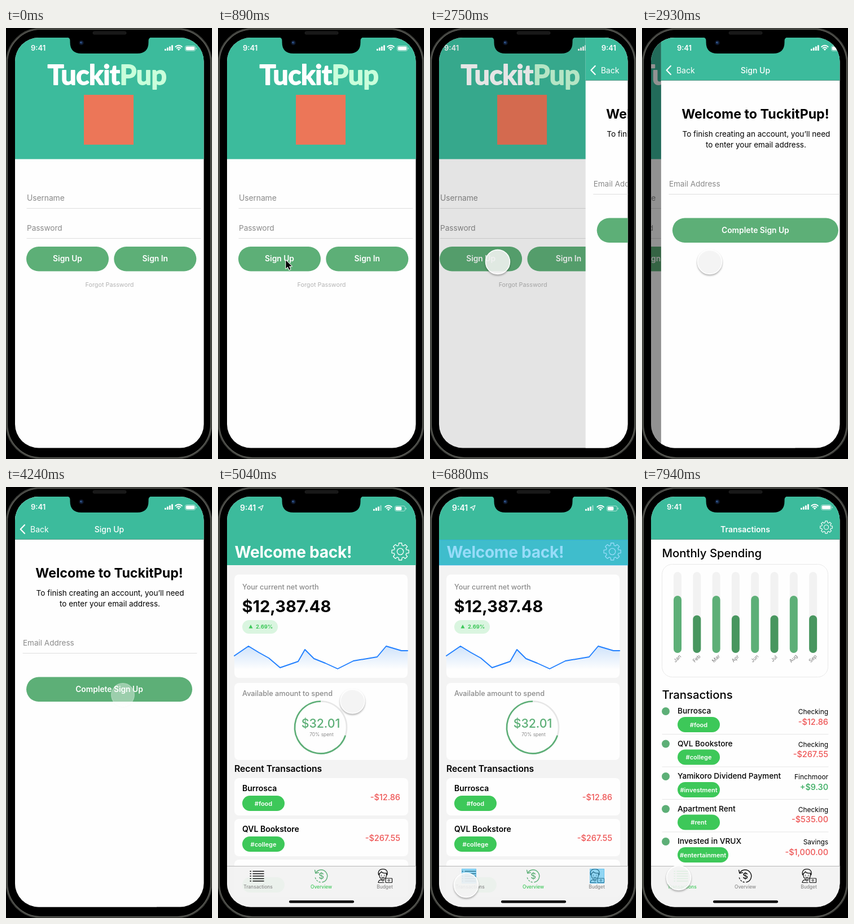
Write an HTML page that moves like this. It is 365 by 761 pixels and loops after 8000 ms.

```html
<!DOCTYPE html>
<html lang="en">
<head>
<meta charset="utf-8">
<title>Wallet app walkthrough</title>
<style>
  html, body { margin: 0; width: 100%; height: 100%; overflow: hidden; background: #000; }
  svg { display: block; width: 365px; height: 761px; font-family: Inter, "Open Sans", sans-serif; }
</style>
</head>
<body>
<svg id="stage" viewBox="0 0 365 761"></svg>
<script>
const TEAL = '#3cbb9c', GREEN = '#5daf77', LIME = '#3dc859', RED = '#ee5555', GREY = '#8a8a8a';
const LOOP = 8000, TICK = 88.12;

// ---- drawing helpers ----
const text = (x, y, str, size, fill = '#000', weight = 400, anchor = 'start', gap = 0) =>
  `<text x="${x}" y="${y}" font-size="${size}" fill="${fill}" font-weight="${weight}" text-anchor="${anchor}" letter-spacing="${gap}">${str}</text>`;
const mid = (x, y, str, size, fill, weight) => text(x, y, str, size, fill, weight, 'middle');
const end = (x, y, str, size, fill, weight) => text(x, y, str, size, fill, weight, 'end');
const box = (x, y, w, h, fill, r = 0, more = '') =>
  `<rect x="${x}" y="${y}" width="${w}" height="${h}" rx="${r}" fill="${fill}" ${more}/>`;
const dot = (x, y, r, fill, more = '') => `<circle cx="${x}" cy="${y}" r="${r}" fill="${fill}" ${more}/>`;
const line = (d, stroke, w = 1, more = '') =>
  `<path d="${d}" fill="none" stroke="${stroke}" stroke-width="${w}" stroke-linecap="round" stroke-linejoin="round" ${more}/>`;
const rule = (x1, x2, y, stroke = '#dedede') => line(`M${x1} ${y}H${x2}`, stroke, 1);
const button = (x, y, w, label) =>
  box(x, y, w, 43.5, GREEN, 21.75) + mid(x + w / 2, y + 26.4, label, 13.8, '#fff', 600);
const tag = (x, y, label, w = 75) =>
  box(x, y, w, 27, LIME, 13.5) + mid(x + w / 2, y + 17.6, label, 11, '#fff', 600);

function gear(cx, cy, r, w) {
  const pts = [];
  for (let k = 0; k < 8; k++)
    for (const [off, q] of [[-.27, .75], [-.17, 1], [.17, 1], [.27, .75]]) {
      const a = k * Math.PI / 4 + off;
      pts.push(`${(cx + r * q * Math.cos(a)).toFixed(2)} ${(cy + r * q * Math.sin(a)).toFixed(2)}`);
    }
  return line(`M${pts.join('L')}Z`, '#fff', w) + dot(cx, cy, r * .37, 'none', `stroke="#fff" stroke-width="${w}"`);
}

function status({ x, y, size, sig, wifi, bat, bars, charge }) {
  let out = text(x, y, '9:41', size, '#fff', 600);
  for (let i = 0; i < 4; i++) {
    const h = 3.2 + i * 2.2;
    out += box(sig + i * 4, y - h, 2.8, h, '#fff', .8, i < bars ? '' : 'opacity=".4"');
  }
  for (const r of [4.6, 8]) {
    const d = r * .72, top = y - 1 - d;
    out += line(`M${wifi - d} ${top}A${r} ${r} 0 0 1 ${wifi + d} ${top}`, '#fff', 1.9);
  }
  out += `<path d="M${wifi} ${y}l-2.3 -2.5q2.3 -1.8 4.6 0z" fill="#fff"/>`;
  out += box(bat + .5, y - 8.5, 18, 9, 'none', 2.6, 'stroke="#fff" stroke-opacity=".55"');
  out += box(bat + 1.8, y - 7.2, charge, 6.4, '#fff', 1.6);
  return out + box(bat + 19.6, y - 5.5, 1.3, 3, '#fff', .6, 'opacity=".6"');
}
const plainStatus = status({ x: 44, y: 40, size: 13, sig: 281, wifi: 306, bat: 317, bars: 4, charge: 15.4 });

// ---- tab bar ----
function listIcon(c) {
  let out = '';
  for (let i = 0; i < 5; i++) out += line(`M57 ${678.5 + i * 4.3}h1.4m3.6 0h19`, c, 1.5);
  return out;
}
const overviewIcon = c =>
  line('M173.2 681.5A11 11 0 1 1 185 697.8', c, 1.4) +
  line('M181 697.8A11 11 0 0 1 172.2 689', c, 1.4, 'stroke-dasharray="2 3"') +
  line('M171.6 676.5l1.3 5.5 5.4 -1.2', c, 1.4) + mid(183, 692.3, '$', 15, c, 500);
const budgetIcon =
  line('M286 683v3a6.2 6.6 0 0 0 12.4 0v-3', '#111', 1.2) +
  line('M284.6 685c-1.6 -6 1.2 -10.4 7.6 -10.4s9.2 4.4 7.4 10.4l-1.4 -3.4q-6.6 1 -9 -2.4q-.6 2.6 -3.2 3z', '#111', 1.3) +
  line('M289.6 685.3v.6m5.2 -.6v.6M290 689q2.2 1.8 4.4 0M284 698.5q.6 -4.5 5 -5.2l3 2.4 2.5 -1.6M284 698.5h10', '#111', 1.2) +
  box(297, 691, 11.5, 7.5, '#f3f3f3', .8, 'stroke="#111" stroke-width="1.2"') +
  dot(302.7, 694.7, 1.5, 'none', 'stroke="#111"');

function tabs(active) {
  const label = (i, x, name) => mid(x, 708.5, name, 8.4, i === active ? LIME : GREY, 500);
  return box(16, 669, 335, 73, '#f3f3f3', 0, 'opacity=".96"') + rule(16, 351, 669.5, '#b8b8b8') +
    listIcon(active === 0 ? LIME : '#111') + overviewIcon(active === 1 ? GREEN : '#111') + budgetIcon +
    label(0, 71, 'Transactions') + label(1, 183, 'Overview') + label(2, 295.5, 'Budget') +
    box(126, 730, 115, 4.5, '#000', 2.2);
}

// ---- screens ----
const page = fill => box(16, 17, 335, 725, fill);
const header = h => box(16, 17, 335, h, TEAL);
const bar = title => header(75) + rule(16, 351, 92.5, '#5f9c8c') + plainStatus + title;

const login = page('#fefefe') + header(214.5) + plainStatus +
  `<text x="179" y="100" font-family="Lato, sans-serif" font-size="48" font-weight="700" text-anchor="middle" letter-spacing="-.4" stroke-width="1.8" stroke-linejoin="round"><tspan fill="#fff" stroke="#fff">Tuckit</tspan><tspan fill="#c9ffdb" stroke="#c9ffdb">Pup</tspan></text>` +
  box(138, 118, 88, 88, '#ec7658') +
  text(37, 305, 'Username', 13.9, GREY, 400, 'start', -.1) + rule(37, 345, 318.5) +
  text(37, 358, 'Password', 13.7, GREY, 400, 'start', -.1) + rule(37, 345, 371.5) +
  button(36, 386, 146, 'Sign Up') + button(191.3, 386, 146, 'Sign In') +
  mid(183.5, 456.5, 'Forgot Password', 10.8, '#b4b4b4');

const signUp = page('#fefefe') + bar(mid(183, 79.5, 'Sign Up', 14, '#fff', 500)) +
  line('M33 67l-7.3 7.5 7.3 7.5', '#fff', 2.2) + text(43, 79.5, 'Back', 14, '#fff') +
  mid(183, 160, 'Welcome to TuckitPup!', 23.2, '#000', 700) +
  mid(184.5, 192, 'To finish creating an account, you’ll need', 13.5) +
  mid(184, 211, 'to enter your email address.', 13.5) +
  text(30, 280, 'Email Address', 13.5, GREY) + rule(30, 338, 293.5) +
  button(36, 335.5, 294, 'Complete Sign Up');

const worth = 'M29 298L54 281 72 292 90 302 110 319 142 308 154 287 170 303 190 311 212 321 240 307 282 300 298 281 325 289H336';
const recent = (y, name, label, amount) => box(29, y, 308, 66, '#fefefe', 8) +
  text(43, y + 23, name, 14, '#000', 600) + tag(43, y + 31, label) + end(323, y + 38.5, amount, 14.5, RED, 500);
const ring = (stroke, more) => dot(182, 424.5, 46, 'none', `stroke="${stroke}" stroke-width="2.6" pathLength="100" ${more}`);

const overview = page('#f3f3f3') + header(121) +
  status({ x: 39, y: 42, size: 14, sig: 275, wifi: 302, bat: 313, bars: 3, charge: 10.5 }) +
  line('M80 32.5l-8.5 4.1 4.2 .7 .9 4.2z', '#fff', 1.1) +
  text(29.5, 125, 'Welcome back!', 28.1, '#fff', 700, 'start', -.3) + gear(323, 114, 15.2, 1.3) +
  box(29, 154.5, 307, 182.5, '#fefefe', 8) +
  text(43, 181, 'Your current net worth', 12.6, GREY, 500) +
  text(42.5, 221, '$12,387.48', 29, '#000', 700) +
  box(43, 235, 63, 24, '#daf5e0', 12) + `<path d="M54.5 249.5h7l-3.5 -6.5z" fill="${LIME}"/>` +
  text(67, 250.3, '2.69%', 9.3, LIME, 700) +
  `<path d="${worth}V322H29Z" fill="url(#fade)"/>` + line(worth, '#2280ff', 1.9) +
  box(29, 346, 307, 136, '#fefefe', 8) + text(43, 368.5, 'Available amount to spend', 12.7, GREY, 500) +
  ring('#e6e6e6', '') + ring(GREEN, 'stroke-dasharray="70 100" transform="rotate(18 182 424.5)"') +
  mid(182, 425, '$32.01', 21.3, GREEN, 500) + mid(183.5, 439.5, '70% spent', 8.4, GREY) +
  text(29, 503.3, 'Recent Transactions', 15.7, '#000', 600) +
  recent(514, 'Burrosca', '#food', '-$12.86') +
  recent(586, 'QVL Bookstore', '#college', '-$267.55') +
  recent(658, '', '', '') + tabs(1);

const months = ['Jan', 'Feb', 'Mar', 'Apr', 'Jun', 'Jul', 'Aug', 'Sep'].map((m, i) => {
  const x = 63 + i * 34.3, top = i % 2 ? 226.5 : 192;
  return box(x - 7, 150, 14, 143, '#f2f2f2', 7) + box(x - 7, top, 14, 293 - top, i % 2 ? '#48965f' : GREEN, 7) +
    `<g transform="translate(${x + 1.5} 305) rotate(-45)">${mid(0, 0, m, 8.6, '#777')}</g>`;
}).join('');

const rows = [
  ['Burrosca', '#food', 'Checking', '-$12.86'],
  ['QVL Bookstore', '#college', 'Checking', '-$267.55'],
  ['Yamikoro Dividend Payment', '#investment', 'Finchmoor', '+$9.30'],
  ['Apartment Rent', '#rent', 'Checking', '-$535.00'],
  ['Invested in VRUX', '#entertainment', 'Savings', '-$1,000.00'],
].map(([name, label, account, amount], i) => {
  const y = 400 + i * 57.5;
  return (i ? rule(36, 330, y - 21, '#e6e6e6') : '') + dot(42, y - 4, 7, GREEN) +
    text(63, y, name, 13.7, '#000', 500) + tag(63, y + 6, label, label.length > 12 ? 90 : 75) +
    end(330, y + 1, account, 11.9) +
    end(330, y + 19.5, amount, 14.5, amount[0] === '+' ? '#36ab5e' : RED, 500);
}).join('');

const spending = page('#fefefe') + bar(mid(183, 79.5, 'Transactions', 14, '#fff', 600)) + gear(326.5, 71, 11, 1.1) +
  text(35.5, 124, 'Monthly Spending', 20.3, '#000', 500) +
  box(35.5, 136.5, 294, 199, '#fefefe', 18, 'stroke="#e8e8e8"') + months +
  text(35.5, 373.5, 'Transactions', 20.3, '#000', 500) + rows + tabs(0);

const hotspot = (x, y, w, h) =>
  box(x, y, w, h, '#43c0f5', 0, 'fill-opacity=".55" stroke="#2fb0ef" stroke-opacity=".6"');

document.getElementById('stage').innerHTML = `
  <defs>
    <clipPath id="glass">${box(16, 17, 334.5, 724.5, '#000', 42)}</clipPath>
    <linearGradient id="fade" x1="0" y1="0" x2="0" y2="1">
      <stop stop-color="#cfe3fb"/><stop offset="1" stop-color="#fefefe"/>
    </linearGradient>
  </defs>
  ${box(0, 0, 365, 761, '#000')}
  ${box(1.5, 1.5, 362, 758, '#000', 60, 'stroke="#3f403c" stroke-width="4"')}
  ${box(2.5, 2.5, 360, 756, '#000', 59, 'stroke="#62635d" stroke-width="1.2"')}
  ${box(154, 6.5, 59, 4.5, '#171717', 2.2, 'stroke="#2a2a2a" stroke-width=".8"')}
  <g clip-path="url(#glass)">
    <g id="login">${login}</g>
    <rect id="dim" x="16" y="17" width="335" height="725"/>
    <g id="signUp">${signUp}</g>
    <g id="overview">${overview}</g>
    <g id="hint">${hotspot(16, 93.5, 335, 44.5)}${hotspot(56.5, 674.5, 25, 25)}${hotspot(283.5, 674.5, 25, 25)}</g>
    <g id="spending">${spending}</g>
  </g>
  <path d="M108 16.5q5.500 .5 5.500 6v2.5q0 20 20 20h99q20 0 20 -20v-2.5q0 -5.500 5.500 -6z" fill="#000"/>
  ${dot(133.5, 26, 4.3, '#0d1526')}${dot(133.5, 26, 2.4, '#1b3358')}${dot(132.6, 25.4, 1, '#4a7cc0')}
  <g id="arrow"><path transform="translate(1.3 1.3) scale(.93)" d="M0 0v15.5l3.6 -3.4 2.6 5.9 2.5 -1.1 -2.5 -5.8h5z" stroke="#fff" stroke-width="2.2" stroke-linejoin="round" paint-order="stroke"/></g>
  <g id="touch"><circle cx="1" cy="4" fill="#fff" fill-opacity=".84" stroke="#fff" stroke-width="1.5"/></g>`;

// ---- motion ----
const SIGNED_IN = 4405, LISTED = 7930;
const moves = [ // begin and finish, goal, sideways swing
  { from: 440, to: 885, x: 119, y: 409, swing: 0 },
  { from: 3560, to: 4200, x: 206, y: 363, swing: 0 },
  { from: 4850, to: 5600, x: 196, y: 558, swing: 46 },
  { from: 5840, to: 6290, x: 63, y: 699, swing: 0 },
  { from: 7300, to: 7660, x: 64, y: 686, swing: 0 },
];
const presses = [[1430, 2030], [2400, 3530], [4165, 4670], [4865, 5460], [6630, 7225], [7600, 8600]];

const clamp = v => Math.min(1, Math.max(0, v));
const ease = f => f < .5 ? 4 * f ** 3 : 1 - 4 * (1 - f) ** 3;

function tipAt(t) {
  let x = 329, y = 420;
  for (const m of moves) {
    const f = clamp((t - m.from) / (m.to - m.from)), e = ease(f);
    x += (m.x - x) * e + m.swing * Math.sin(Math.PI * f);
    y += (m.y - y) * e;
  }
  return [x, y];
}

// the touch mark comes in quickly and leaves more slowly
const pressAt = t => Math.max(...presses.map(([down, up]) => clamp(Math.min((t - down) / 160, (up - t) / 250))));

const el = id => document.getElementById(id);
const show = (id, on) => el(id).style.display = on ? '' : 'none';
const set = (id, name, value) => el(id).setAttribute(name, value);

function draw(time) {
  const t = Math.floor((time + 8) / TICK) * TICK + 10; // each picture is held for one tick

  // critically damped push from login to sign up
  const u = Math.max(0, t - 2700) * .0214, rest = (1 + u) * Math.exp(-u);
  const pushed = u > 0 && t < SIGNED_IN;
  show('login', t < SIGNED_IN);
  show('dim', pushed);
  show('signUp', pushed);
  set('login', 'transform', `translate(${-84 * (1 - rest)} 0)`);
  set('dim', 'opacity', .45 * (1 - rest));
  set('signUp', 'transform', `translate(${335 * rest} 0)`);

  show('overview', t >= SIGNED_IN && t < LISTED);
  show('spending', t >= LISTED);
  const glow = t < 6875 ? 0 : clamp((7420 - t) / 500);
  show('hint', glow > 0);
  set('hint', 'opacity', glow);

  const seen = t >= moves[0].from, v = pressAt(t), place = `translate(${tipAt(t)})`;
  show('arrow', seen && v === 0);
  show('touch', v > 0);
  set('arrow', 'transform', place);
  set('touch', 'transform', place);
  set('touch', 'opacity', v);
  el('touch').firstChild.setAttribute('r', 19 + 2.5 * v);
  el('touch').style.filter = `drop-shadow(0 2px 1.5px rgba(0,0,0,${.33 * v ** 3}))`;
}

const start = performance.now();
function tick() {
  draw((performance.now() - start) % LOOP);
  requestAnimationFrame(tick);
}
tick();
</script>
</body>
</html>
```
